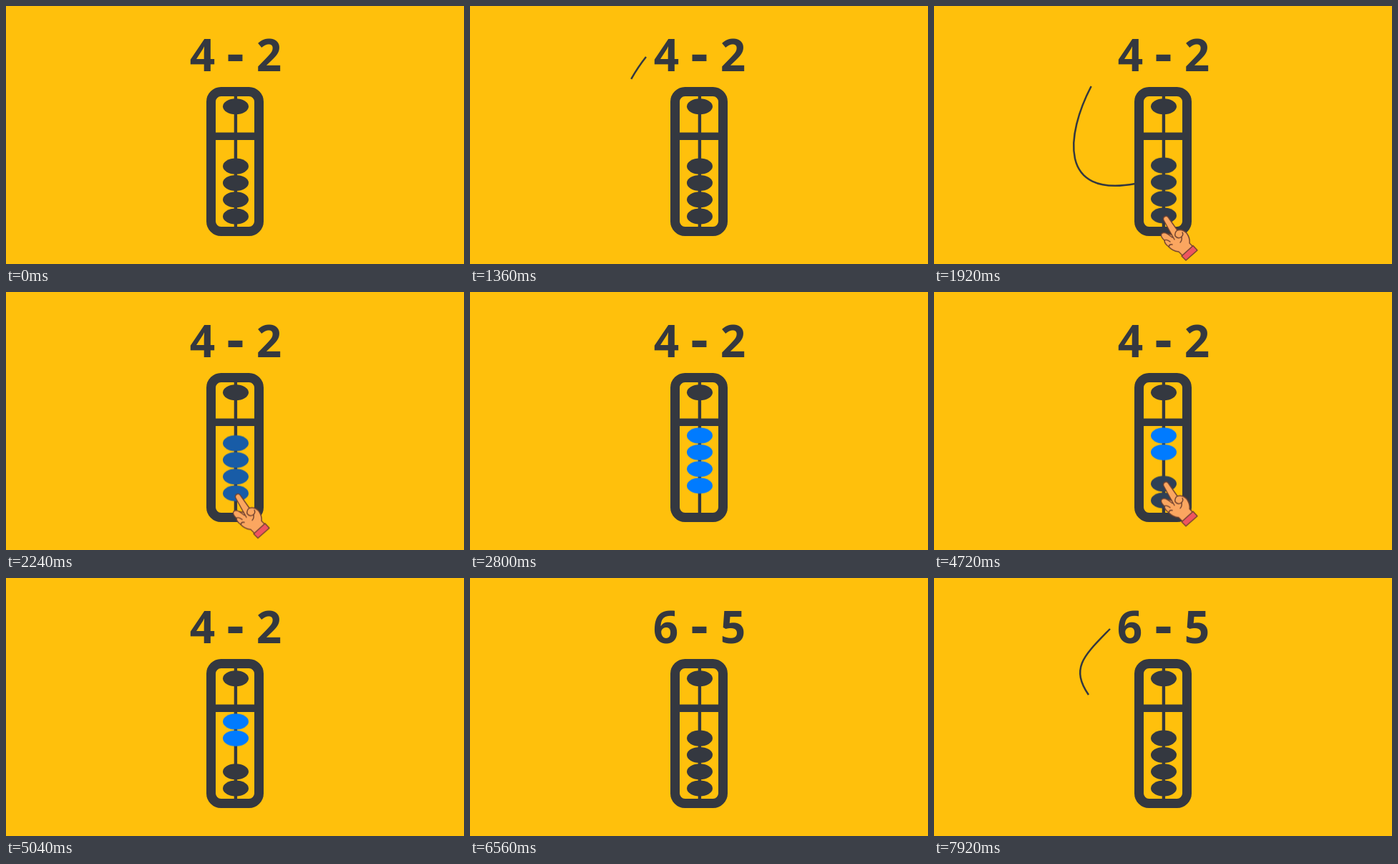
Recreate the animation shown at these times as an HTML page without scripts. Size 640 by 360 pixels, loop 8000 ms.

```html
<!DOCTYPE html>
<html lang="en">
<head>
<meta charset="utf-8">
<title>Abacus subtraction</title>
<style>
  :root { --ink: #343840; --blue: #007bff; --up: -23.3px; }
  html, body { margin: 0; width: 100%; height: 100%; overflow: hidden; background: #ffc00c; }
  svg { display: block; width: 100%; height: 100%; }

  text { font: 700 62px "Noto Sans", "Open Sans", sans-serif; text-anchor: middle; fill: var(--ink); }
  .minus { font-size: 76px; }
  .frame { fill: none; stroke: var(--ink); stroke-width: 13; }
  .bead, .rod { fill: var(--ink); }
  .line { fill: none; stroke: var(--ink); stroke-width: 2.5; stroke-dasharray: 1 2; stroke-dashoffset: 1; }
  .skin { fill: #fba660; }
  .cuff { fill: #ee5560; }
  .hand { stroke: #70412f; stroke-width: 1.4; stroke-linejoin: round; stroke-linecap: round; }
  .crease { fill: none; }

  .line, .bead, .hand, .sum { animation: 8s linear infinite; }
  .first { animation-name: first-sum; }
  .second { animation-name: second-sum; }
  .stay { animation-name: stay; }
  .return { animation-name: return; }
  .hand { animation-name: push; }
  .to-four { animation-name: to-four; }
  .to-two { animation-name: to-two; }
  .to-six { animation-name: to-six; }

  @keyframes first-sum { 0%, 81.99% { opacity: 1 } 82%, 100% { opacity: 0 } }
  @keyframes second-sum { 0%, 81.99% { opacity: 0 } 82%, 100% { opacity: 1 } }

  @keyframes stay {
    0% { transform: none; fill: var(--ink) }
    22.5% { transform: none; fill: var(--ink); animation-timing-function: cubic-bezier(.37, 0, .63, 1) }
    33%, 81.99% { transform: translateY(var(--up)); fill: var(--blue) }
    82%, 100% { transform: none; fill: var(--ink) }
  }
  @keyframes return {
    0% { transform: none; fill: var(--ink) }
    22.5% { transform: none; fill: var(--ink); animation-timing-function: cubic-bezier(.37, 0, .63, 1) }
    33% { transform: translateY(var(--up)); fill: var(--blue) }
    52% { transform: translateY(var(--up)); fill: var(--blue); animation-timing-function: cubic-bezier(.37, 0, .63, 1) }
    61%, 100% { transform: none; fill: var(--ink) }
  }
  @keyframes push {
    0%, 20% { transform: translateY(16px); opacity: 0 }
    22.5% { transform: translateY(1px); opacity: 1; animation-timing-function: cubic-bezier(.37, 0, .63, 1) }
    33% { transform: translateY(-22.3px); opacity: 1 }
    35% { transform: translateY(-22.3px); opacity: 0 }
    48% { transform: translateY(-34px); opacity: 0 }
    50.5% { transform: translateY(-49px); opacity: 1 }
    52% { transform: translateY(-49px); opacity: 1; animation-timing-function: cubic-bezier(.37, 0, .63, 1) }
    61% { transform: translateY(-25.7px); opacity: 1 }
    63%, 100% { transform: translateY(-25.7px); opacity: 0 }
  }

  @keyframes to-four {
    0%, 16.25% { stroke-dashoffset: 1 }
    21.5%, 23.25% { stroke-dashoffset: 0 }
    27.25%, 100% { stroke-dashoffset: -1 }
  }
  @keyframes to-two {
    0%, 44.25% { stroke-dashoffset: 1 }
    49.5%, 52.25% { stroke-dashoffset: 0 }
    56.25%, 100% { stroke-dashoffset: -1 }
  }
  @keyframes to-six {
    0%, 96.5% { stroke-dashoffset: 1 }
    99%, 100% { stroke-dashoffset: 0 }
  }
</style>
</head>
<body>
<svg viewBox="0 0 640 360">
  <text class="sum first" y="91"><tspan x="274.5">4</tspan><tspan class="minus" x="320.5" y="92.5">-</tspan><tspan x="367.5" y="91">2</tspan></text>
  <text class="sum second" y="91"><tspan x="273.5">6</tspan><tspan class="minus" x="320.5" y="92.5">-</tspan><tspan x="367.5" y="91">5</tspan></text>

  <path class="line to-four" pathLength="1" d="M246 71C195 135 150 272 281 248"/>
  <path class="line to-two" pathLength="1" d="M398 68C500 145 505 250 360 258"/>
  <path class="line to-six" pathLength="1" d="M246 71C210 108 190 125 216 163"/>

  <rect class="frame" x="286.5" y="119.5" width="67" height="195" rx="14"/>
  <path class="rod" d="M318.7 126h4.4v182h-4.4zM292 176.5h56v10.5h-56z"/>

  <ellipse class="bead" cx="321" cy="140.3" rx="18" ry="11"/>
  <ellipse class="bead stay" cx="321" cy="223.6" rx="18" ry="11"/>
  <ellipse class="bead stay" cx="321" cy="246.9" rx="18" ry="11"/>
  <ellipse class="bead return" cx="321" cy="270.2" rx="18" ry="11"/>
  <ellipse class="bead return" cx="321" cy="293.5" rx="18" ry="11"/>

  <g class="hand">
    <path class="skin" d="M321 299C319 294 325 291 328 296L340 313Q347 311 353 317Q358 324 357 331L362 336L348 349L342 343Q333 342 328 336Q322 332 322 327Q316 322 318 318Q321 315 326 318L332 319Z"/>
    <path class="crease" d="M332 319l4 7M326 318l7 5M322 327q3-2 8 2M328 336q1-4 5-3M340 313q-4 3-3 8q4 5 9 1q3-3 1-6M346 322q1 5-2 8"/>
    <path class="cuff" d="M346 349L362 334.500L368 341L352 355Z"/>
  </g>
</svg>
</body>
</html>
```
